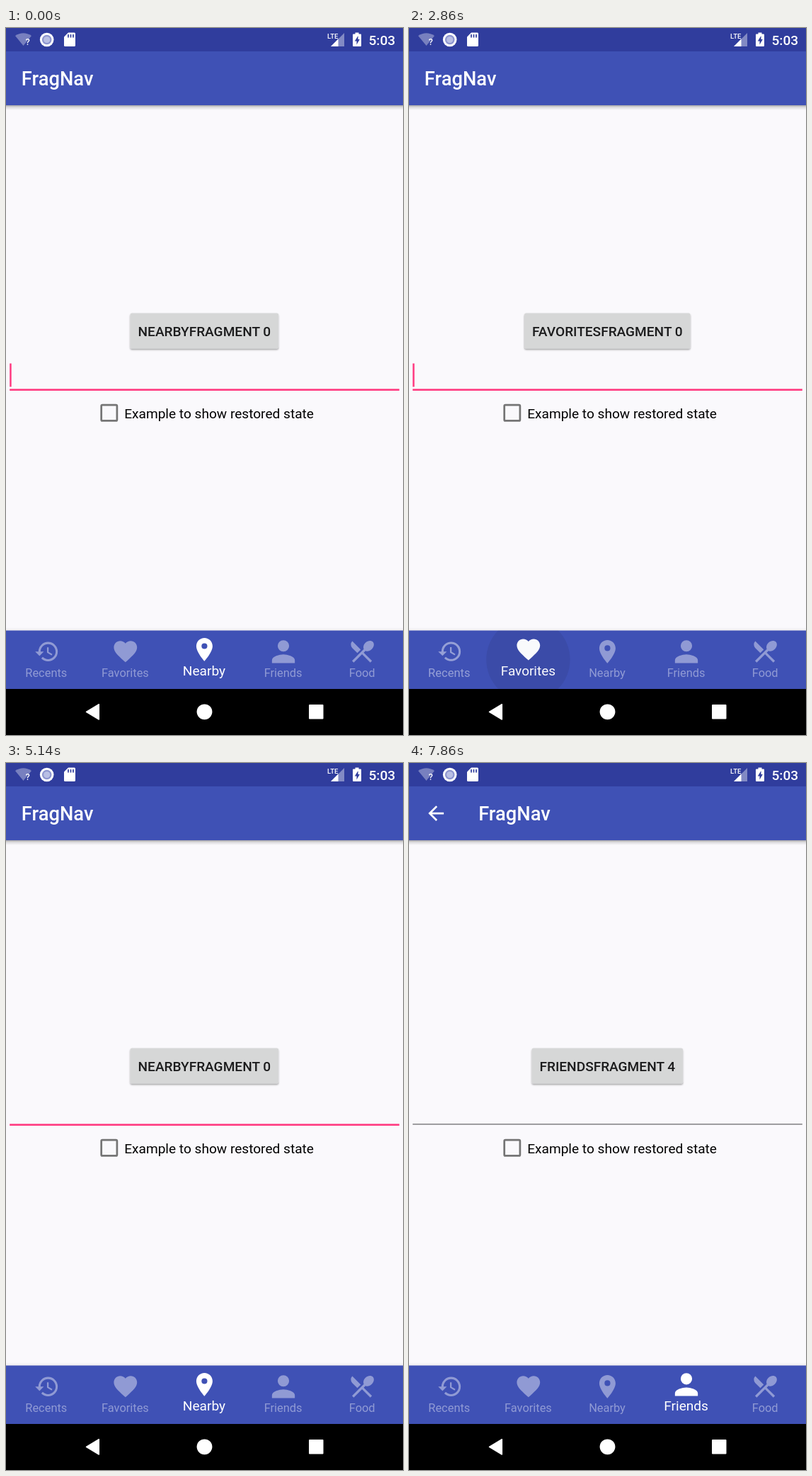
Recreate the animation shown at these times as an HTML page. Size 561 by 998 pixels, loop 8000 ms.

```html
<!DOCTYPE html>
<html lang="en">
<head>
<meta charset="utf-8">
<title>FragNav</title>
<style>
  html, body { margin: 0; height: 100%; overflow: hidden; background: #faf9fc; }
  svg { display: block; width: 100vw; height: 100vh; font-family: Roboto, sans-serif; }
  .medium { font-weight: 500; }
  .center { text-anchor: middle; }
</style>
</head>
<body>
<svg viewBox="0 0 561 998">
  <defs>
    <linearGradient id="shade" x2="0" y2="1">
      <stop offset="0" stop-opacity=".34"/>
      <stop offset=".4" stop-opacity=".12"/>
      <stop offset="1" stop-opacity="0"/>
    </linearGradient>
    <linearGradient id="glow" x2="0" y2="1">
      <stop offset="0" stop-opacity="0"/>
      <stop offset="1" stop-opacity=".06"/>
    </linearGradient>
    <filter id="raised" x="-10%" y="-20%" width="120%" height="150%">
      <feDropShadow dx="0" dy="1.6" stdDeviation="1.3" flood-opacity=".38"/>
    </filter>
    <clipPath id="bar"><rect y="850.5" width="561" height="82.5"/></clipPath>
  </defs>

  <rect width="561" height="998" fill="#faf9fc"/>

  <!-- status bar and toolbar -->
  <rect y="109" width="561" height="7" fill="url(#shade)"/>
  <rect y="32" width="561" height="77" fill="#3f51b5"/>
  <rect width="561" height="33" fill="#303d9d"/>
  <g fill="#fff">
    <path d="M13 11Q24.500 3.500 36 11L24.500 25Z" opacity=".35"/>
    <text class="medium" x="27.500" y="24" font-size="13">?</text>
    <circle cx="57.700" cy="16.500" r="9.800"/>
    <circle cx="57.700" cy="16.500" r="6.800" fill="#8d95cf"/>
    <circle cx="57.700" cy="16.500" r="4.600" fill="#b9bfe4"/>
    <path d="M88 6.500H96.500Q98 6.500 98 8V24.500Q98 26 96.500 26H83.500Q82 26 82 24.500V12.500Z"/>
    <path d="M88 9v4.500M91.500 9v4.500M95 9v4.500" stroke="#303d9d" stroke-width="1.700"/>
    <text class="medium" x="454" y="15" font-size="9.500" textLength="">LTE</text>
    <path d="M478 7V26H459L468 17V15.500H469.500Z" opacity=".4"/>
    <path d="M469.500 15.500V26H459Z"/>
    <path d="M493.500 6.500h5v2h2.500q1 0 1 1V25q0 1-1 1h-10q-1 0-1-1V9.500q0-1 1-1h2.500z"/>
    <path d="M497.500 11L492.800 18.500H495.500V23.500L499.800 16H497.500Z" fill="#303d9d"/>
    <text class="medium" x="512.500" y="23.700" font-size="19.100">5:03</text>
    <path id="back" transform="translate(21.800 54.700) scale(1.365)"
      d="M20 11H7.830l5.590-5.590L12 4l-8 8 8 8 1.410-1.410L7.830 13H20z"/>
    <text id="title" class="medium" y="81" font-size="27.300">FragNav</text>
  </g>

  <!-- page -->
  <rect id="button" y="402.500" height="50" rx="2.500" fill="#d6d7d7" filter="url(#raised)"/>
  <text id="caption" class="medium center" x="280.300" y="434.500" font-size="19.100" fill="#1b1b1c"></text>
  <rect id="cursor" x="5.200" y="473.500" width="2.500" height="33" fill="#ff3a80"/>
  <rect id="underline" x="5.200" width="550.600"/>
  <rect x="134.700" y="532.200" width="22.200" height="22.200" rx="1.500" fill="none" stroke="#757575" stroke-width="2.700"/>
  <text x="167.200" y="550.500" font-size="19.100">Example to show restored state</text>

  <!-- bottom tabs and system keys -->
  <rect y="846" width="561" height="5" fill="url(#glow)"/>
  <rect y="850.500" width="561" height="83" fill="#3f51b5"/>
  <circle id="ripple" cy="891.500" fill-opacity=".07" clip-path="url(#bar)"/>
  <g id="tabs" fill="#fff"></g>
  <rect y="933" width="561" height="65"/>
  <g fill="#fff">
    <path d="M113.500 965.300L131.300 954.700V976Z" stroke="#fff" stroke-width="1.500" stroke-linejoin="round"/>
    <circle cx="280.500" cy="965.300" r="10.900"/>
    <rect x="428" y="955" width="20.500" height="20.500" rx="1"/>
  </g>
</svg>

<script>
const FRAME_RATE = 7, LOOP = 8000;
const $ = id => document.getElementById(id);
const clamp = (v, lo, hi) => Math.min(hi, Math.max(lo, v));
const lerp = (a, b, k) => a + (b - a) * k;

function set(el, attrs) {
  for (const name in attrs) el.setAttribute(name, attrs[name]);
}

function add(parent, tag, attrs) {
  const el = document.createElementNS('http://www.w3.org/2000/svg', tag);
  set(el, attrs);
  return parent.appendChild(el);
}

// cx, cy: middle of the icon in its own units
const tabs = [
  { name: 'Recents', cx: 11.5, cy: 12, scale: 1.52, icon: 'M13 3a9 9 0 0 0-9 9H1l3.89 3.89.07.14L9 12H6c0-3.87 3.13-7 7-7s7 3.13 7 7-3.13 7-7 7c-1.93 0-3.68-.79-4.94-2.06l-1.42 1.42A8.95 8.95 0 0 0 13 21a9 9 0 0 0 0-18zm-1 5v5l4.28 2.54.72-1.21-3.5-2.08V8z' },
  { name: 'Favorites', cx: 12, cy: 12.2, scale: 1.64, icon: 'M12 21.35l-1.45-1.32C5.4 15.36 2 12.28 2 8.5 2 5.42 4.42 3 7.5 3c1.74 0 3.41.81 4.5 2.09C13.09 3.81 14.76 3 16.5 3 19.58 3 22 5.42 22 8.5c0 3.78-3.4 6.86-8.55 11.54z' },
  { name: 'Nearby', cx: 12, cy: 12, scale: 1.64, icon: 'M12 2C8.13 2 5 5.13 5 9c0 5.25 7 13 7 13s7-7.75 7-13c0-3.87-3.13-7-7-7zm0 9.5a2.5 2.5 0 0 1 0-5 2.5 2.5 0 0 1 0 5z' },
  { name: 'Friends', cx: 12, cy: 12, scale: 2.02, icon: 'M12 12a4 4 0 0 0 0-8 4 4 0 0 0 0 8zm0 2c-2.67 0-8 1.34-8 4v2h16v-2c0-2.66-5.33-4-8-4z' },
  { name: 'Food', cx: 12.3, cy: 12.2, scale: 1.7, icon: 'M8.1 13.34l2.83-2.83L3.91 3.5a4 4 0 0 0 0 5.66zm6.78-1.81c1.53.71 3.68.21 5.27-1.38 1.91-1.91 2.28-4.65.81-6.12-1.46-1.46-4.2-1.1-6.12.81-1.59 1.59-2.09 3.74-1.38 5.27L3.7 19.87l1.41 1.41L12 14.41l6.88 6.88 1.41-1.41L13.41 13z' },
];

tabs.forEach((tab, i) => {
  tab.x = 280 + (i - 2) * 111.6;
  tab.group = add($('tabs'), 'g', {});
  tab.path = add(tab.group, 'path', { d: tab.icon });
  tab.label = add(tab.group, 'text', { class: 'center', x: tab.x });
  tab.label.textContent = tab.name;
});

// start, push and hide count steps; mix holds the selection progress after a tap
const visits = [
  { tab: 2, start: 0, mix: [], push: 99, depth: 0, hide: [4, 8] },
  { tab: 0, start: 9, mix: [0.5, 0.95], push: 14, depth: 1 },
  { tab: 1, start: 19, mix: [0.15, 0.95], push: 22, depth: 4 },
  { tab: 2, start: 31, mix: [0.45, 0.95], push: 37, depth: 4, hide: [36, 37] },
  { tab: 3, start: 47, mix: [0.93, 0.98], push: 52, depth: 4, hide: [51, 52] },
];

function drawTab(tab, selected) {
  const y = lerp(880.3, 877.4, selected);
  set(tab.group, { opacity: lerp(0.42, 1, selected) });
  set(tab.path, {
    transform: `translate(${tab.x + 0.4} ${y}) scale(${tab.scale}) translate(${-tab.cx} ${-tab.cy})`,
  });
  set(tab.label, { y: lerp(916.3, 914.4, selected), 'font-size': lerp(16.4, 19.1, selected) });
}

function drawPage(name, depth, cursorOn) {
  const root = depth === 0;
  set($('back'), { visibility: root ? 'hidden' : 'visible' });
  set($('title'), { x: root ? 21.8 : 98.2 });
  set($('cursor'), { visibility: root && cursorOn ? 'visible' : 'hidden' });
  set($('underline'), root
    ? { y: 509.4, height: 2.6, fill: '#ff3a80' }
    : { y: 509.2, height: 1.4, fill: '#77777a' });
  $('caption').textContent = `${name.toUpperCase()}FRAGMENT ${depth}`;
  const width = $('caption').getComputedTextLength() + 22;
  set($('button'), { x: 280.3 - width / 2, width });
}

function draw(step) {
  const at = visits.findLastIndex(v => v.start <= step);
  const visit = visits[at];
  const previous = at > 0 ? visits[at - 1].tab : -1;
  const age = step - visit.start;
  const mix = visit.mix[age] ?? 1;
  const [hideFrom, hideTo] = visit.hide ?? [99, 99];

  tabs.forEach((tab, i) => drawTab(tab, i === visit.tab ? mix : i === previous ? 1 - mix : 0));
  set($('ripple'), {
    cx: tabs[visit.tab].x,
    r: age < visit.mix.length ? 44 + 16 * mix : 0,
  });
  drawPage(
    tabs[visit.tab].name,
    clamp(step - visit.push + 1, 0, visit.depth),
    step < hideFrom || step >= hideTo,
  );
}

let shown = -1;
function tick() {
  // the small lead absorbs rounding of step times to 10 ms
  const step = Math.floor((performance.now() % LOOP + 6) * FRAME_RATE / 1000) % (LOOP * FRAME_RATE / 1000);
  if (step !== shown) draw(shown = step);
  requestAnimationFrame(tick);
}
tick();
</script>
</body>
</html>
```
